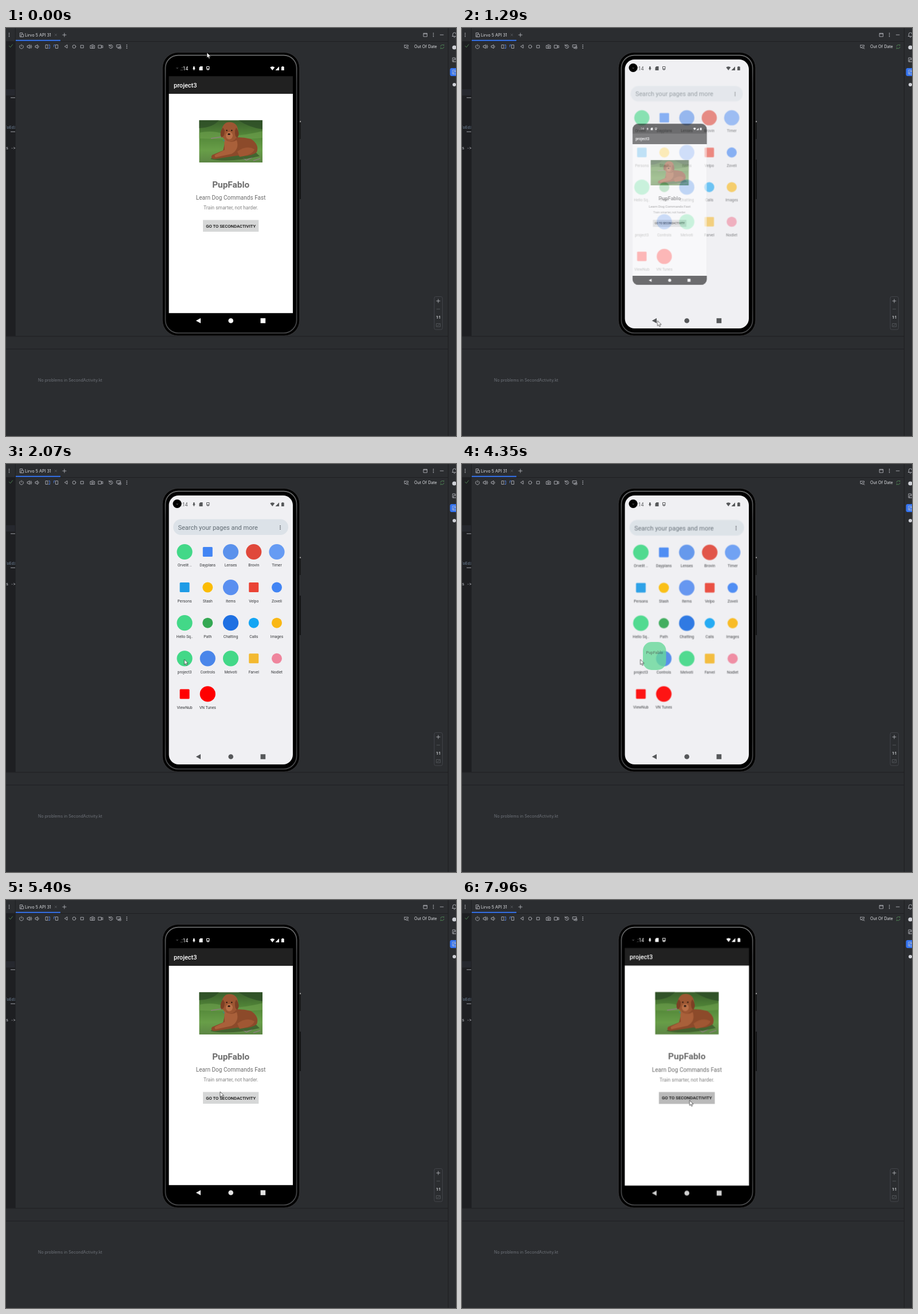
An HTML page that plays this animation: 786 px wide and 713 px high, repeating every 8000 ms.

```html
<!DOCTYPE html>
<html lang="en">
<head>
<meta charset="utf-8">
<title>Emulator session</title>
<style>
html, body { margin: 0; width: 100%; height: 100%; overflow: hidden; background: #2b2d30; }
svg { display: block; width: 786px; height: 713px; }
text { font-family: Roboto, sans-serif; }
.ui { font: 7.15px Inter, sans-serif; fill: #dfe1e5; }
.mono { font: 7px "DejaVu Sans Mono", monospace; }
.line { fill: none; stroke: #bfc1c7; stroke-width: .8; stroke-linecap: round; stroke-linejoin: round; }
.dim { stroke: #5a5d63; }
.mid { text-anchor: middle; }

#cursor, #home, #grid, #app, #ripple, #launch, #button, #keys, #tapped {
  animation: 8s step-end infinite;
}
#app, #grid { transform-origin: 392.7px 290px; }
#cursor { animation-name: cursor; }
#home { animation-name: home; }
#grid { animation-name: grid; }
#app { animation-name: app; }
#ripple { animation-name: ripple; }
#launch { animation-name: launch; }
#button { animation-name: button; }
#keys { animation-name: keys; }
#tapped { animation-name: tapped; }

@keyframes cursor {
  0% { transform: translate(351px, 43px); }
  1.875% { transform: translate(355px, 25.5px); }
  5.25% { transform: translate(373px, 92px); }
  6.75% { transform: translate(393px, 230px); }
  8.25% { transform: translate(378px, 385px); }
  9.75% { transform: translate(349px, 492px); }
  11.25% { transform: translate(341.5px, 511.5px); }
  19.5% { transform: translate(338px, 478px); }
  21% { transform: translate(326px, 408px); }
  22.5% { transform: translate(318px, 365px); }
  24.375% { transform: translate(313px, 346px); }
  25.875% { transform: translate(311.5px, 341.5px); }
  62.5% { transform: translate(328px, 336px); }
  64% { transform: translate(354px, 329.5px); }
  65.5% { transform: translate(371px, 333px); }
  67.5% { transform: translate(374px, 335px); }
  69% { transform: translate(373px, 334px); }
  70.75% { transform: translate(363px, 250px); }
  72.25% { transform: translate(357px, 176px); }
  74.125% { transform: translate(396px, 197px); }
  75.875% { transform: translate(426px, 216px); }
  77.375% { transform: translate(405px, 267px); }
  78.875% { transform: translate(365px, 262px); }
  80.5% { transform: translate(336.5px, 231px); }
  82.375% { transform: translate(384px, 224.5px); }
  84.25% { transform: translate(379px, 280px); }
  85.75% { transform: translate(385px, 331.5px); }
  87.625% { transform: translate(397px, 349px); }
  89.5%, 100% { transform: translate(397.5px, 350px); }
}
@keyframes home {
  0% { opacity: 0; }
  16.125% { opacity: 1; }
  59.25%, 100% { opacity: 0; }
}
@keyframes grid {
  0%, 16.125% { transform: scale(.975); opacity: .6; }
  18% { transform: translateY(.4px) scale(.996); opacity: .92; }
  19.5% { transform: none; opacity: 1; }
  54.375% { transform: translateY(.4px) scale(.996); opacity: .92; }
  55.875% { transform: scale(.975); opacity: .6; }
  57.375%, 100% { transform: scale(.96); opacity: .3; }
}
@keyframes app {
  0% { transform: none; opacity: 1; }
  16.125% { transform: translate(-30px, 18px) scale(.6); opacity: .55; }
  18% { transform: none; opacity: 0; }
  55.875% { transform: translate(-15px, 8px) scale(.72); opacity: 1; }
  57.375% { transform: translate(-1px, 1px) scale(.97); opacity: 1; }
  59.25% { transform: none; opacity: 1; }
  99.5%, 100% { transform: scale(1.003); opacity: 1; }
}
@keyframes ripple {
  0% { opacity: 0; }
  13.125% { opacity: .6; }
  14.625% { opacity: 1; }
  16.125%, 100% { opacity: 0; }
}
@keyframes launch {
  0% { opacity: 0; }
  54.375% { opacity: .8; }
  55.875%, 100% { opacity: 0; }
}
@keyframes tapped {
  0% { opacity: 0; }
  18% { opacity: 1; }
  54.375%, 100% { opacity: 0; }
}
@keyframes button {
  0% { fill: #d6d7d7; }
  98% { fill: #c9c9c9; }
  99.5%, 100% { fill: #bababa; }
}
@keyframes keys {
  0% { color: #fff; }
  59.25% { color: #e4e4e4; }
  82.375%, 100% { color: #d2d2d2; }
}
</style>
</head>
<body>
<svg viewBox="0 0 786 713" xmlns="http://www.w3.org/2000/svg">
  <defs>
    <clipPath id="screen"><rect x="284.5" y="55" width="216.5" height="470" rx="17"/></clipPath>
    <clipPath id="strip"><path d="M0 0H16V538H0Z"/></clipPath>
    <clipPath id="picClip"><path d="M337.5 161.3H448V235H337.5Z"/></clipPath>
    <linearGradient id="grass" x2="0" y2="1">
      <stop offset="0" stop-color="#3a5f2d"/><stop offset=".35" stop-color="#528638"/>
      <stop offset=".7" stop-color="#689e48"/><stop offset="1" stop-color="#5c8544"/>
    </linearGradient>
    <linearGradient id="rim" x2="0" y2="1">
      <stop offset="0" stop-color="#6c6d6e"/><stop offset=".1" stop-color="#444547"/>
      <stop offset=".9" stop-color="#3a3b3c"/><stop offset="1" stop-color="#4c4d4f"/>
    </linearGradient>
    <g id="bar" fill="currentColor">
      <path d="M327 68.2a1.3 1.3 0 0 1 2.6 0v2a1.3 1.3 0 0 1-2.6 0ZM326 70.5h1a1.4 1.4 0 0 0 2.6 0h1a2.4 2.4 0 0 1-1.8 2v1.5h-1v-1.5a2.4 2.4 0 0 1-1.8-2Z"/>
      <path d="M339.5 67H343.5V74H337.5V69Z"/>
      <path d="M350.5 67.5h4.5v2.5a2.3 2.3 0 0 1-4.5 0ZM350.5 71.5h4.5a2.3 2.3 0 0 1-4.5 0" fill="none" stroke="currentColor"/>
      <path d="M461.3 68.8a6 6 0 0 1 8 0L465.3 74ZM477 67.3V74H470.5ZM481 67.7h1.4v-.8h2v.8h1.3V74H481Z"/>
    </g>
    <g id="nav" fill="currentColor">
      <path d="M331.8 511.5L340 507V516Z"/><circle cx="392.7" cy="511.5" r="4.3"/>
      <path d="M444.6 507.2h8.6v8.6h-8.6Z"/>
    </g>
    <g id="dots"><circle cy="-2.8" r=".8"/><circle r=".8"/><circle cy="2.8" r=".8"/></g>
    <g id="slab" class="line"><path d="M-3 1.5V-3.5H1.5V-1.5M-3 1.5V3.5H-1M-.5 -.8H3.2V3.5H-.5Z"/></g>
  </defs>

  <!-- editor window -->
  <path d="M0 0H786V713H0Z" fill="#2b2d30"/>
  <path d="M0 23H16V538H0Z" fill="#1e1f22"/>
  <path d="M0 107H16V118H0Z" fill="#26282e"/>
  <path d="M16.2 0V538.8M16 23.5H772M772.3 0V713M0 538.8H772M0 561H772" stroke="#1e1f22" fill="none"/>
  <path d="M17 20.8H95V22.8H17Z" fill="#3574f0"/>
  <g clip-path="url(#strip)">
    <path class="line" d="M5.5 31.5L7.6 33.7L11.5 28.8" style="stroke:#57965c"/>
    <path class="line" d="M8.5 121.8H16M8.5 181.3H16"/>
    <text class="mono" x="-3" y="175.5" fill="#71869d">ToEdi</text>
    <text class="mono" x="0" y="211.5" fill="#ced0d6">s -&gt;</text>
  </g>
  <g fill="#ced0d6">
    <use href="#dots" x="5.5" y="12"/><use href="#dots" x="211" y="32.5"/><use href="#dots" x="746.5" y="12"/>
  </g>
  <use href="#slab" x="27.3" y="12"/>
  <text class="ui" x="33" y="14.7">Lirvo 5 API 31</text>
  <path class="line dim" d="M85.2 10.3l3.6 3.6m0-3.6l-3.6 3.6"/>
  <g class="line">
    <path d="M102 9V15.2M98.9 12.1H105.1M758.3 12H764"/>
    <path d="M729.5 9.2H735.5V15H729.5ZM729.5 10.3H735.5"/>
    <path d="M27 28.8V32M24.9 30a3.4 3.4 0 1 0 4.2 0"/>
    <path d="M37.5 31H39L41 29V36L39 34H37.5ZM42.5 31a2.5 2.5 0 0 1 0 3.2M43.7 29.5a4.5 4.5 0 0 1 0 6"/>
    <path d="M51.5 31H53L55 29V36L53 34H51.5ZM56.7 31a2.5 2.5 0 0 1 0 3.2"/>
    <path d="M69.5 29.5H73V35.5H69.5ZM87 29.5H90.7V35.5H87Z"/>
    <path d="M74.5 29.5H76.5V35.5H74.5M85.5 29.5H83.7V33" style="stroke:#548af7"/>
    <path d="M107 29.8V35.2L102.7 32.5Z"/><circle cx="119" cy="32.5" r="2.8"/><path d="M130.7 30.2H135.3V34.8H130.7Z"/>
    <path d="M147.5 30.5H149.2L150 29.2H152.2L153 30.5H154.7V35.5H147.5Z"/><circle cx="151" cy="32.8" r="1.5"/>
    <path d="M161.5 30H166.5V35.2H161.5ZM166.5 32L169 30.5V34.8L166.5 33.3"/>
    <path d="M180.3 31a3.2 3.2 0 1 1-.2 2.5M180 29V31.2H182.2M183.2 31V32.8L184.5 33.5"/>
    <path d="M193.5 29.5H200V33.5H193.5ZM195 35.5H197M198 33H200.7V36H198Z"/>
    <path d="M696 30H702.5V32M696 30V34.5H698.5M700.2 32.2a1.7 1.7 0 1 0 .1 0M701.5 35l1.5 1.5"/>
    <path d="M759 32a3.2 3.2 0 0 1 5.8-1.2V29M765 33.2a3.2 3.2 0 0 1-5.8 1.2V36.3" style="stroke:#57965c"/>
    <path d="M779.3 14.5H786M780.3 14.3V11a3 3 0 0 1 6 0M782.3 16.2H784"/>
  </g>
  <text class="ui" x="713" y="35.2">Out Of Date</text>
  <circle cx="783" cy="34" r="3.6" fill="#ced0d6"/>
  <use href="#slab" x="783" y="55.5"/>
  <rect x="775.5" y="70" width="14" height="14" rx="3" fill="#3574f0"/>
  <use href="#slab" x="783" y="77"/>
  <circle cx="783" cy="99" r="3" fill="#ced0d6"/>
  <rect x="748" y="469.5" width="14.3" height="57.5" rx="2.5" fill="#2b2d30" stroke="#43454a"/>
  <path class="line" d="M755 474V480M752 477H758"/>
  <path class="line dim" d="M752.3 491.2H757.7M752 516.5H758.5V522H752ZM753.5 520.5L757 518"/>
  <text class="ui mid" x="755" y="507.5" style="font-size:6.2px;font-weight:600">1:1</text>
  <text class="ui" x="56" y="617.5" style="fill:#6f737a">No problems in SecondActivity.kt</text>

  <!-- device -->
  <path d="M512 162H514.5V194H512ZM512 230H514.8V299H512Z" fill="#0b0b0b"/>
  <path d="M513 162.5H515V164.5H513Z" fill="#b9b9b9"/>
  <rect x="273.2" y="42.6" width="239.6" height="495.4" rx="27" fill="#030303" stroke="#3b3c3e" stroke-width=".8"/>
  <rect x="278.4" y="47.6" width="229.2" height="485.4" rx="22.5" fill="#000" stroke="url(#rim)" stroke-width="1.7"/>

  <g id="home" clip-path="url(#screen)">
    <path d="M284 55H502V525H284Z" fill="#f0f0f3"/>
    <g color="#56585a">
      <use href="#bar"/><use href="#nav"/>
      <text x="306" y="73.7" font-size="8.4" fill="currentColor">:14</text>
    </g>
    <g id="grid">
      <rect x="292" y="96.5" width="201" height="27.5" rx="13.7" fill="#dce2e8"/>
      <text x="300.5" y="114.7" font-size="11" fill="#616c74">Search your pages and more</text>
      <use href="#dots" x="479" y="111" fill="#22262a"/>
    </g>
  </g>

  <g id="launch">
    <rect x="316" y="311" width="40.5" height="49" rx="15" fill="#68d99b"/>
    <text class="mid" x="336.2" y="332" font-size="7" font-weight="700" fill="#45805f">PupFablo</text>
  </g>

  <g id="app"><g clip-path="url(#screen)">
    <path d="M284 55H502V525H284Z"/>
    <path d="M284 84.3H502V115H284Z" fill="#212121"/>
    <path d="M284 115H502V498.3H284Z" fill="#fff"/>
    <text x="293" y="104" font-size="11" font-weight="500" fill="#fff">project3</text>
    <g color="#fff">
      <use href="#bar"/>
      <text x="304.5" y="73.7" font-size="8.4" fill="currentColor">.:14</text>
    </g>
    <rect id="ripple" x="311" y="498.5" width="50.5" height="26" rx="13" fill="#1f1f1f"/>
    <g id="keys"><use href="#nav"/></g>

    <g clip-path="url(#picClip)">
      <path d="M337 161H449V236H337Z" fill="url(#grass)"/>
      <path d="M337 183Q360 178 380 185T449 180V192Q410 196 337 193Z" fill="#6fa04d" opacity=".6"/>
      <path d="M337 161H372Q362 174 337 175ZM406 161H449V177Q424 174 406 161Z" fill="#2c4a26" opacity=".7"/>
      <path d="M358 193l20-3M420 231l10-5m2 6l12-4M414 227l6 4" stroke="#a3779d" stroke-width="1.6" opacity=".65"/>
      <path d="M357 229Q390 236 443 224L436 217L368 221Z" fill="#2f4722" opacity=".6"/>
      <path d="M384 194Q405 188 428 194Q443 204 438 217Q426 226 404 223L364 229Q356 228 360 222L379 214Z" fill="#8c4a2a"/>
      <path d="M381 193Q392 203 403 196Q408 212 394 220L366 226Q362 222 368 220L382 213Z" fill="#a9603a"/>
      <path d="M404 216Q420 204 434 212Q431 222 408 225Z" fill="#a05733"/>
      <path d="M377 177Q380 164 391 164.5Q403 165 405 177Q408 189 402 192Q394 203 385 195Q373 192 377 177Z" fill="#9c5632"/>
      <path d="M379 174Q372 182 376 191Q382 191 382 179ZM402 174Q410 184 404 192Q399 190 400 179Z" fill="#7d3f24"/>
      <ellipse cx="390" cy="188" rx="6" ry="6.5" fill="#b97048"/>
      <g fill="#26150f"><ellipse cx="389.5" cy="185.5" rx="2.2" ry="1.6"/><circle cx="385.6" cy="179" r="1.2"/><circle cx="394.3" cy="179" r="1.2"/></g>
      <path d="M379 195l3 3" stroke="#3b8d86" stroke-width="1.5"/>
    </g>
    <g class="mid" fill="#6c6c6c">
      <text x="392.7" y="278.6" font-size="15.4" font-weight="700">PupFablo</text>
      <text x="392.7" y="300" font-size="10.05">Learn Dog Commands Fast</text>
      <text x="392.7" y="316.8" font-size="8.6" fill="#858585">Train smarter, not harder.</text>
      <path id="button" d="M344 335.5H441.3V356H344Z"/>
      <text x="392.7" y="348.5" font-size="7.7" font-weight="500" fill="#0c0c0c">GO TO SECONDACTIVITY</text>
    </g>
  </g></g>

  <circle cx="299" cy="69.5" r="7.6"/>
  <path d="M297.7 69.3l1.2 1.4 1.6-1.3" fill="none" stroke="#85878a" stroke-width=".9"/>

  <path id="cursor" d="M0 0V9.1L2 7.3L3.5 10.5L5 9.8L3.6 6.7H6.6Z" fill="#fff" stroke="#222" stroke-width=".7" stroke-linejoin="round"/>
</svg>
<script>
// label, colour, shape: O large disc, o small disc, s small square
const apps = `Orvelit ..,#43d888,O|Dayplans,#4285f4,s|Lenses,#5a91ec,O|Brovin,#e0483b,O|Timer,#669bf3,O
Persons,#1e9be6,s|Stash,#fbbc04,o|Items,#5a8ff0,O|Velpo,#ea4335,s|Zoveli,#4285f4,o
Hello Sq..,#43d888,O|Path,#34a853,o|Chatting,#1f70e2,O|Calls,#14a5f3,o|Images,#f9b714,o
project3,#43d888,O|Controls,#4a86ea,O|Melvoti,#43d888,O|Farvel,#f3b931,s|Nodlet,#ef859d,o
ViewNub,#ff0000,s|VN Tunes,#ff0000,O`;

const grid = document.getElementById('grid');

function add(tag, attrs, content = '') {
  const el = document.createElementNS('http://www.w3.org/2000/svg', tag);
  for (const key in attrs) el.setAttribute(key, attrs[key]);
  el.textContent = content;
  grid.append(el);
}

apps.split('\n').forEach((row, r) => row.split('|').forEach((cell, c) => {
  const [label, fill, shape] = cell.split(',');
  const x = 312 + c * 40.25, y = 153.5 + r * 62.1;
  const id = label === 'project3' ? { id: 'tapped' } : {};
  if (shape === 's') add('rect', { x: x - 8.5, y: y - 8.5, width: 17, height: 17, rx: 1.5, fill });
  else add('circle', { cx: x, cy: y, r: shape === 'O' ? 13.6 : 9, fill, ...id });
  add('text', { x, y: y + 25.9, 'font-size': 6.8, fill: '#35373a', class: 'mid' }, label);
}));
</script>
</body>
</html>
```
